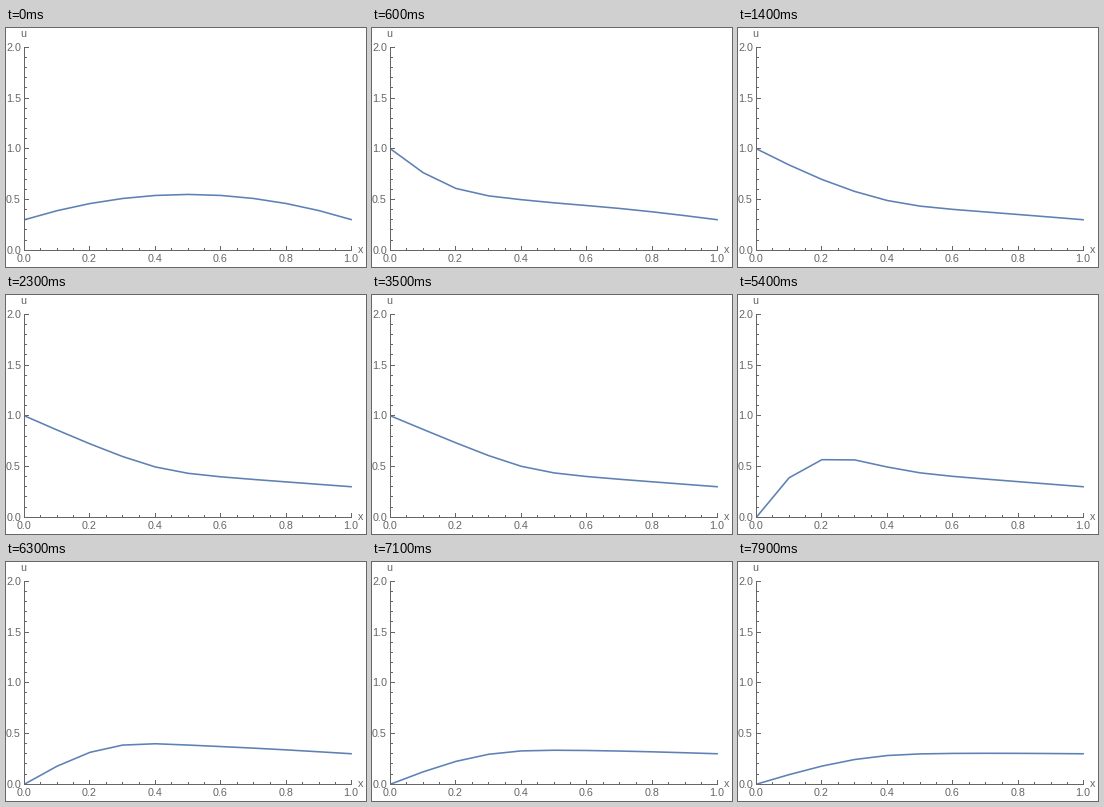
Recreate the animation shown at these times as a matplotlib script. Size 360 px wide and 239 px high, loop 8 s.

```python
import matplotlib.pyplot as plt
import numpy as np
from matplotlib.animation import FuncAnimation

W, H, DPI = 360, 239, 100
FRAMES, STEP = 80, 100          # count, ms
X0, Y0, SX, SY = 18.4, 222.2, 327.5, 101.4
GRAY, BLUE = "#666666", "#5e81b5"
PX = 72 / DPI                   # points per pixel


def solve(n=10, sub=50):
    """Heat flow through a rod whose conductivity rises in the middle."""
    x = np.linspace(0, 1, n + 1)
    dt = STEP / 1000 / sub
    mid = (x[1:] + x[:-1]) / 2
    d = 0.0255 + 0.105 / (1 + np.exp(-(mid - 0.52) / 0.06))
    lap = np.zeros((n + 1, n + 1))
    for i in range(1, n):
        lap[i, i - 1:i + 2] = d[i - 1], -d[i - 1] - d[i], d[i]
    step = np.linalg.inv(np.eye(n + 1) - dt * n * n * lap)
    u = 0.3 + x * (1 - x)
    rows = [u]
    for k in range((FRAMES - 1) * sub):
        u = u.copy()
        u[0] = 1.0 if k * dt < 5 - dt / 2 else 0.0
        u = step @ u
        if (k + 1) % sub == 0:
            rows.append(u)
    return x, rows


def bar(x, y, w, h):
    """Crisp rectangle on whole pixels."""
    ax.add_patch(plt.Rectangle((x, y), w, h, fc=GRAY, lw=0, zorder=3,
                               antialiased=False))


def label(x, y, s, ha="center"):
    ax.text(x, y, s, color=GRAY, ha=ha, va="baseline",
            family="Liberation Sans", size=10.8 * PX)


fig = plt.figure(figsize=(W / DPI, H / DPI), dpi=DPI, facecolor="white")
ax = fig.add_axes([0, 0, 1, 1])
ax.set(xlim=(0, W), ylim=(H, 0))
ax.axis("off")

left, base = int(X0), int(Y0)
top = int(Y0 - 2 * SY)
bar(left, base, int(SX) + 1, 1)
bar(left, top, 1, base - top + 1)
for i in range(21):
    px, py = int(X0 + SX * i / 20), int(Y0 - SY * i / 10)
    rise = 4 if i % 4 == 0 else 2
    bar(px, base - rise, 1, rise)
    bar(left + 1, py, 4 if i % 5 == 0 else 2, 1)
    if i % 4 == 0:
        label(px - 0.2, 234, f"{i / 20:.1f}")
    if i % 5 == 0:
        label(15, py + 4, f"{i / 10:.1f}", "right")
label(17.7, 9, "u")
label(355, 225, "x")

xs, rows = solve()
curve, = ax.plot([], [], color=BLUE, lw=1.6 * PX, solid_joinstyle="round",
                 solid_capstyle="butt", zorder=2)


def draw(k):
    curve.set_data(X0 + SX * xs, Y0 - SY * rows[k])
    return curve,


anim = FuncAnimation(fig, draw, frames=FRAMES, interval=STEP, repeat=True,
                     repeat_delay=0)
plt.show()
```
